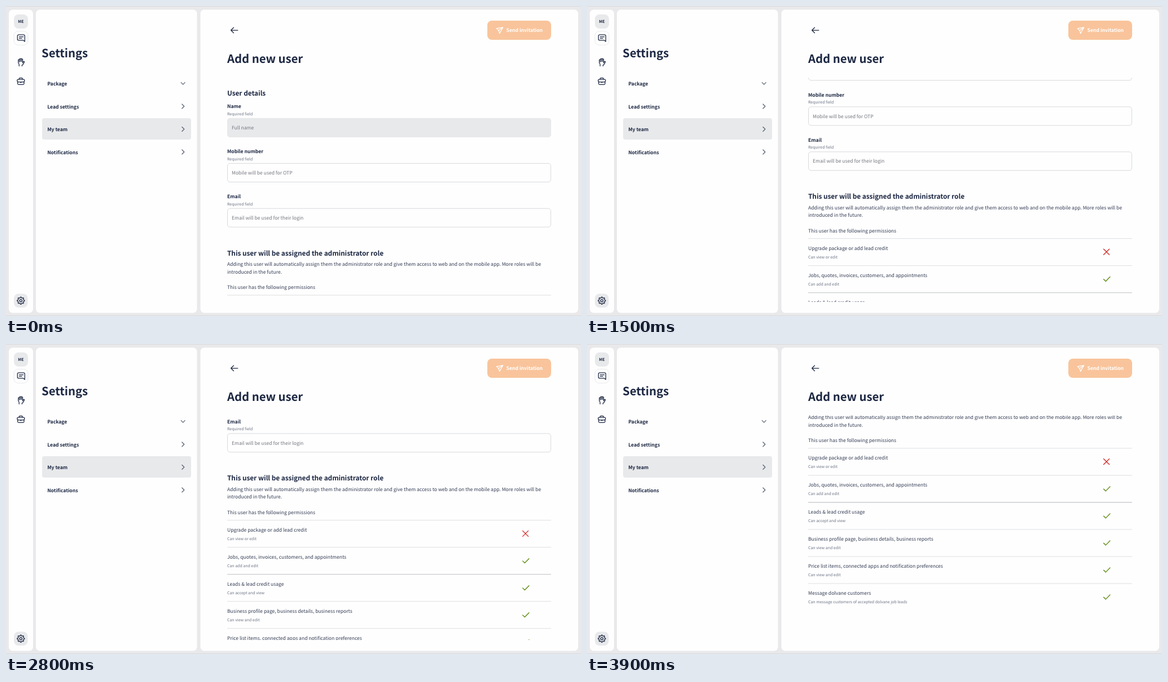
These frames come from a looping animation (1019 by 550 pixels, 6000 ms). An HTML page:

```html
<!DOCTYPE html>
<html lang="en">
<head>
<meta charset="utf-8">
<title>Add new user</title>
<style>
  html, body { margin: 0; width: 100%; height: 100%; overflow: hidden; background: #e9e9eb; }
  svg { display: block; width: 100vw; height: 100vh; }
  text {
    font: 8.55px "Noto Sans CJK JP", "Noto Sans CJK SC", "Noto Sans CJK", "Noto Sans", sans-serif;
    fill: #343d55; text-rendering: geometricPrecision; white-space: pre;
  }
  text.bold { font-size: 8.6px; font-weight: 700; fill: #1c2742; }
  text.title { font-size: 20.3px; font-weight: 700; fill: #1c2742; }
  text.heading { font-size: 11.78px; font-weight: 700; fill: #1c2742; }
  text.small { font-size: 6.97px; fill: #6d7486; }
  text.hint { fill: #74777f; }
  .panel { fill: #fefefe; }
  .shade { fill: #e8e9eb; }
  .field { fill: #fefefe; stroke: #d8d9dc; }
  .rule { stroke: #dedfe1; }
  .rule.strong { stroke: #cbccd0; stroke-width: 1.3; }
  .icon { fill: none; stroke: #1c2742; stroke-width: 1.25; stroke-linecap: round; stroke-linejoin: round; }
  .chevron { stroke: #535b6e; stroke-width: 1.15; }
  .yes { stroke: #5c8a10; stroke-width: 1.35; }
  .no { stroke: #cf2a27; stroke-width: 1.35; }
</style>
</head>
<body>
<svg viewBox="0 0 1019 550" preserveAspectRatio="none">
  <defs><clipPath id="view"><rect x="391" y="127" width="576" height="398"/></clipPath></defs>
  <path d="M0 .5H1019M0 549.5H1019" stroke="#dadadc"/>
  <rect class="panel" x="5" y="6.5" width="43" height="538" rx="7"/>
  <rect class="panel" x="53" y="6.5" width="285.5" height="538" rx="7"/>
  <rect class="panel" x="344.5" y="6.5" width="669.5" height="538" rx="7"/>

  <rect class="shade" x="14" y="15" width="25" height="25" rx="8"/>
  <text class="bold" x="26.5" y="30.1" text-anchor="middle" style="font-size:7px">ME</text>
  <rect x="14" y="44.8" width="25" height="24.5" rx="7.5" fill="#fefefe" stroke="#e8e9eb"/>
  <path class="icon" d="M22.3 51.2h9a2 2 0 0 1 2 2v9.9l-3-2.4h-8a2 2 0 0 1-2-2v-5.5a2 2 0 0 1 2-2zM23.3 54.6h7.3M23.3 57.4h4.7"/>
  <path class="icon" d="M23.2 106.5v-3.2l-1.4-2.5v-5.2q.9-1.2 1.8 0v3.6v-4.9q.9-1.2 2 0v4.3v-5q1-1.2 2 0v5v-4.2q1-1.1 1.9 0v6.6l1.3-2.2q1-.9 1.9.2l-2.4 4.6l-1.9 1.5v1.4"/>
  <path class="icon" d="M23.3 130.1v-1q0-1.5 1.5-1.5h3q1.5 0 1.5 1.5v1M22 130.2h8.6q2.2 0 2.2 2.1q0 2.6-2.6 2.6h-7.8q-2.6 0-2.6-2.6q0-2.1 2.2-2.1zM20.6 134.5v3.1q0 1.8 1.8 1.8h7.8q1.8 0 1.8-1.8v-3.1M25.2 134.9q1.1 2 2.2 0"/>
  <rect class="shade" x="14" y="510.5" width="24.5" height="24.5" rx="8"/>
  <path class="icon" id="gear"/>
  <circle class="icon" cx="26.3" cy="522.7" r="2.1"/>

  <text class="title" x="63" y="91.1">Settings</text>
  <rect class="shade" x="64" y="199" width="264" height="38" rx="4"/>
  <g id="menu"></g>

  <path class="icon" d="M410.8 43H398.6M403.4 38.2L398.6 43L403.4 47.8"/>
  <rect x="853" y="26" width="113" height="34" rx="8" fill="#f9c49b"/>
  <path class="icon" style="stroke:#fff" d="M869.3 39.8L880.8 37.8L874.6 48.6L873 43.4zM873 43.4L880.8 37.8"/>
  <text class="bold" x="886.6" y="46.3" style="fill:#fff">Send invitation</text>
  <text class="title" x="392" y="101.4">Add new user</text>
  <g clip-path="url(#view)"><g id="page"></g></g>
</svg>
<script>
const $ = id => document.getElementById(id);
const label = (x, y, str, cls = '') => `<text class="${cls}" x="${x}" y="${y}">${str}</text>`;
const icon = (d, cls) => `<path class="icon ${cls}" d="${d}"/>`;
const rule = (y, cls = '') => `<path class="rule ${cls}" d="M392 ${y}H966"/>`;

// Gear outline: eight teeth with four corners each.
$('gear').setAttribute('d', 'M' + Array.from({ length: 32 }, (_, i) => {
  const angle = (Math.floor(i / 4) + [-.3, -.17, .17, .3][i % 4]) * Math.PI / 4;
  const radius = [5, 6.5, 6.5, 5][i % 4];
  return `${26.3 + radius * Math.sin(angle)} ${522.7 - radius * Math.cos(angle)}`;
}).join('L') + 'Z');

$('menu').innerHTML = ['Package', 'Lead settings', 'My team', 'Notifications'].map((name, i) => {
  const y = 137.5 + i * 40.5;
  const chevron = i ? `M311.8 ${y - 4}l4 4l-4 4` : `M310.2 ${y - 1.9}l3.5 3.5l3.5-3.5`;
  return label(73.2, y + 3.7, name, 'bold') + icon(chevron, 'chevron');
}).join('');

const fields = [
  ['Name', 'Full name'],
  ['Mobile number', 'Mobile will be used for OTP'],
  ['Email', 'Email will be used for their login'],
].map(([name, hint], i) => {
  const y = 199.4 + i * 79.9;
  const box = attrs => `<rect x="392.5" y="${y}" width="573" height="33" rx="4.5" ${attrs}/>`;
  return label(392, y - 18.2, name, 'bold') + label(392, y - 5.5, 'Required field', 'small') +
    box('class="field"') + (i ? '' : box('id="hover" fill="#e8e9eb" stroke="#e8e9eb"')) +
    label(400, y + 19.7, hint, 'hint');
}).join('');

const permissions = [
  ['Upgrade package or add lead credit', 'Can view or edit'],
  ['Jobs, quotes, invoices, customers, and appointments', 'Can add and edit'],
  ['Leads &amp; lead credit usage', 'Can accept and view'],
  ['Business profile page, business details, business reports', 'Can view and edit'],
  ['Price list items, connected apps and notification preferences', 'Can view and edit'],
  ['Message dolvane customers', 'Can message customers of accepted dolvane job leads'],
].map(([name, note], i) => {
  const y = 513 + i * 48;
  const mark = i
    ? icon(`M915.6 ${y + 24.2}l3.7 3.7l7.6-7.9`, 'yes')
    : icon(`M915.6 ${y + 18.7}l10 10m0-10l-10 10`, 'no');
  return rule(y, i === 2 ? 'strong' : '') +
    label(392, y + 20, name) + label(392, y + 35.4, note, 'small') + mark;
}).join('');

$('page').innerHTML = label(392, 158.5, 'User details', 'heading') + fields +
  label(392, 442.6, 'This user will be assigned the administrator role', 'heading') +
  label(392, 461.4, 'Adding this user will automatically assign them the administrator role and give them access to web and on the mobile app. More roles will be') +
  label(392, 474.5, 'introduced in the future.') +
  label(392, 502.2, 'This user has the following permissions') + permissions;

// Wheel scrolls: start tick, end tick, distance (30 ticks per second).
const scrolls = [
  [16, 22, 66.4], [41.9, 48, 66.4], [62, 69, 66.4], [83.5, 90, 66.1],
  [95, 96, .3], [106, 111, 62], [116, 117, .4],
];
const clamp = x => Math.min(1, Math.max(0, x));
const ease = x => x * x * (3 - 2 * x);

function draw() {
  const tick = Math.floor((performance.now() % 6000 + 9) * .03);
  const offset = scrolls.reduce((sum, [from, to, distance]) =>
    sum + distance * ease(clamp((tick - from) / (to - from))), 0);
  $('page').setAttribute('transform', `translate(0 ${-offset})`);
  $('hover').setAttribute('opacity', clamp((45 - tick) / 3));
  requestAnimationFrame(draw);
}
draw();
</script>
</body>
</html>
```
